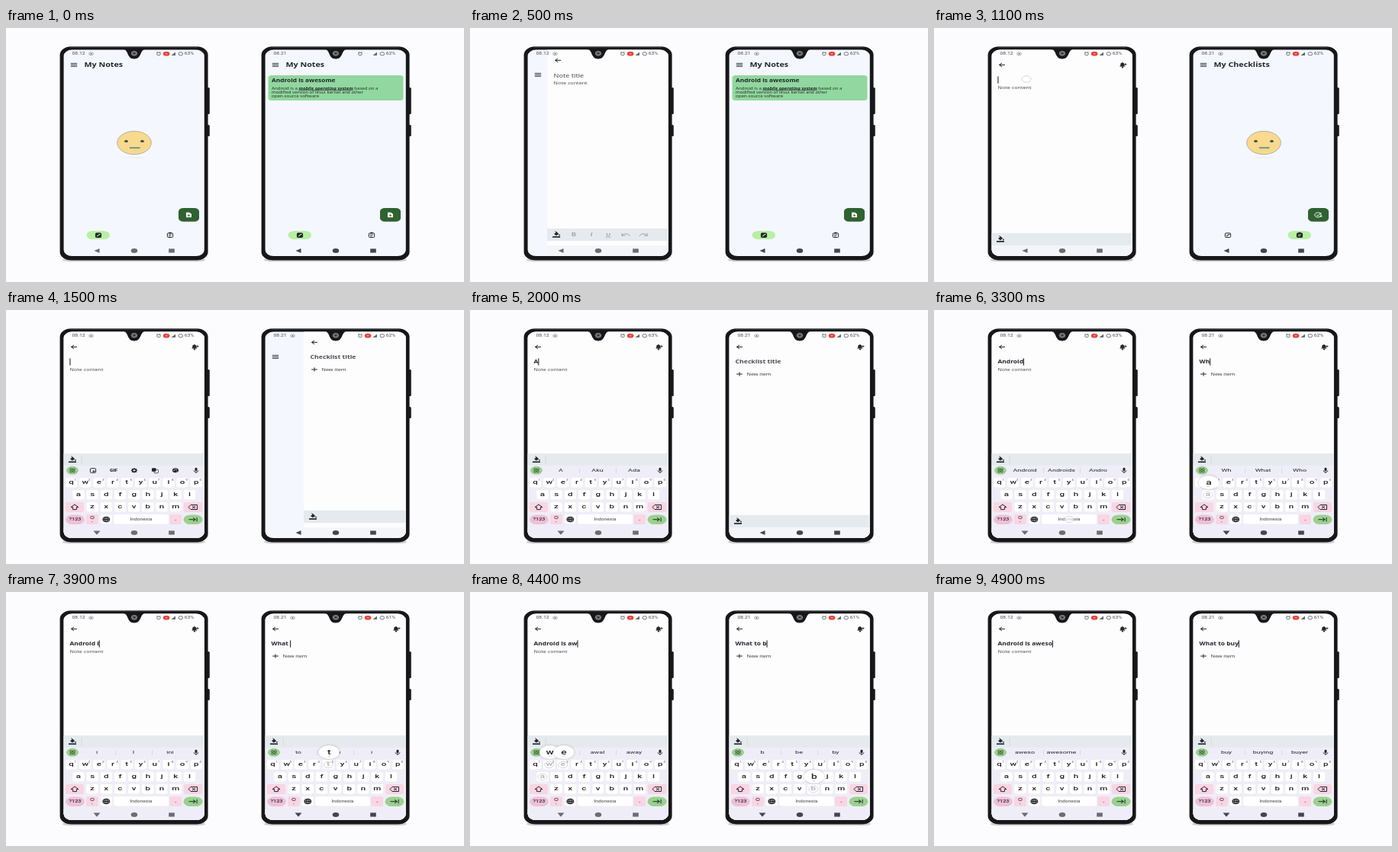
An HTML page with a canvas that plays this animation: 600 by 333 pixels, repeating every 5000 ms.

```html
<!DOCTYPE html>
<html lang="en">
<head>
<meta charset="utf-8">
<title>Notes app on two phones</title>
<style>
html, body { margin: 0; width: 100%; height: 100%; overflow: hidden; background: #fcfbfd; }
canvas { display: block; width: 600px; height: 333px; }
</style>
</head>
<body>
<canvas id="stage"></canvas>
<script>
const canvas = document.getElementById('stage');
const ctx = canvas.getContext('2d');
const dpr = window.devicePixelRatio || 1;
canvas.width = 600 * dpr;
canvas.height = 333 * dpr;

const LOOP = 5000, STEP = 100;
const UI = '"Noto Sans", "Open Sans", sans-serif';
const KEYS = 'Roboto, sans-serif';
const INK = '#24262b', GREEN = '#2f6231', PALE = '#b9efa5', PINK = '#fad5e3', LEAF = '#9bd08f';
const ROWS = ['qwertyuiop', 'asdfghjkl', 'zxcvbnm'];
const ROW_X = [85.5, 95, 113], PITCH = 18.2;

const phones = [
  {
    x: 0, clock: '08.12', battery: () => '63%', nav: '#6c6c70',
    tab: () => 0, card: false, hint: 'Note title', sub: 'Note content',
    open: 350, focus: 1000, rise: 1250,
    typed: 'Android is aweso',
    at: [1800, 2150, 2300, 2450, 2600, 2900, 3050, 3350, 3700, 4050, 4200, 4300, 4400, 4500, 4600, 4700],
    words: ['', 'A Aku Ada', 'An And Anda', 'And Anda Android', 'Andr Android Andri', 'Andro Android Andri',
      'Androi Android Andro', 'Android Androids Andro', 'dan yang di', 'i I ini', 'is isi ini', 'a the not',
      'a ada aku', 'aw awal away', 'awe awesome awet', 'awes awesome', 'aweso awesome'],
    taps: [[200, 239, 245], [1000, 121, 67]]
  },
  {
    x: 264, clock: '08.21', battery: t => t < 3800 ? '62%' : '61%', nav: '#45464b',
    tab: t => ease((t - 700) / 200), card: true, hint: 'Checklist title', sub: 'New item',
    open: 1400, focus: 2100, rise: 2150,
    typed: 'What to buy',
    at: [2950, 3150, 3350, 3500, 3650, 3950, 4100, 4250, 4400, 4550, 4700],
    words: ['', 'W Wa We', 'Wh What Who', 'Wha What Whats', 'What Whats Whatever', 'to you i', 't the to',
      'to too today', 'do be buy', 'b be by', 'bu but buy', 'buy buying buyer'],
    taps: [[600, 215, 271], [1300, 239, 245], [2100, 125, 67]]
  }
];

const clamp = v => Math.max(0, Math.min(1, v));
const ease = v => 1 - (1 - clamp(v)) ** 3;

function text(s, x, y, size, { w = 400, c = INK, a = 'left', f = UI, k = 1.28, i = '' } = {}) {
  ctx.save();
  ctx.translate(x, y + size * 0.36);
  ctx.scale(k, 1);
  ctx.font = `${i} ${w} ${size}px ${f}`;
  ctx.textAlign = a;
  ctx.fillStyle = c;
  ctx.fillText(s, 0, 0);
  const width = ctx.measureText(s).width * k;
  ctx.restore();
  return width;
}

function box(x, y, w, h, rx, ry, fill) {
  ctx.beginPath();
  ctx.roundRect(x, y, w, h, { x: rx, y: ry });
  if (fill) { ctx.fillStyle = fill; ctx.fill(); }
}

function rect(x, y, w, h, fill) {
  ctx.fillStyle = fill;
  ctx.fillRect(x, y, w, h);
}

function oval(x, y, rx, ry, fill, stroke, width = 0.8) {
  ctx.beginPath();
  ctx.ellipse(x, y, rx, ry, 0, 0, Math.PI * 2);
  if (fill) { ctx.fillStyle = fill; ctx.fill(); }
  if (stroke) { ctx.strokeStyle = stroke; ctx.lineWidth = width; ctx.stroke(); }
}

// Points are given flat: x, y, x, y...
function poly(pts, { fill, stroke, width = 1, close = false } = {}) {
  ctx.beginPath();
  for (let n = 0; n < pts.length; n += 2) ctx.lineTo(pts[n], pts[n + 1]);
  if (close) ctx.closePath();
  if (fill) { ctx.fillStyle = fill; ctx.fill(); }
  if (stroke) { ctx.strokeStyle = stroke; ctx.lineWidth = width; ctx.stroke(); }
}

function faded(alpha, draw) {
  if (alpha <= 0) return;
  ctx.save();
  ctx.globalAlpha *= alpha;
  draw();
  ctx.restore();
}

function shifted(dx, dy, draw) {
  ctx.save();
  ctx.translate(dx, dy);
  draw();
  ctx.restore();
}

function sheet(x, y, c, solid) {
  ctx.lineWidth = 1;
  ctx.strokeStyle = c;
  box(x - 3.6, y - 2.6, 7.2, 5.6, 1, 1, solid ? c : null);
  ctx.stroke();
}

function pencilIcon(x, y, solid) {
  sheet(x, y, INK, solid);
  poly([x - 2, y + 1.6, x + 2.4, y - 1.5], { stroke: solid ? PALE : INK, width: 1.1 });
}

function listIcon(x, y, solid) {
  sheet(x, y, INK, solid);
  rect(x - 1.6, y - 3.7, 3.2, 1.6, INK);
  for (const d of [-0.9, 0.9]) rect(x - 2, y + d, d < 0 ? 4 : 2.8, 0.8, solid ? PALE : INK);
}

function bucket(x, y) {
  poly([x - 3, y - 0.6, x + 0.4, y - 3.2, x + 3.2, y - 0.4, x - 0.2, y + 1.7], { fill: INK, close: true });
  poly([x - 1.6, y - 4, x + 0.4, y - 2.4], { stroke: INK });
  oval(x + 4, y + 1, 0.9, 0.9, INK);
  rect(x - 5, y + 2.6, 10, 1.7, INK);
}

function mic(x, y) {
  box(x - 1.5, y - 3.6, 3, 4.6, 1.5, 1.2, INK);
  ctx.beginPath();
  ctx.ellipse(x, y, 3, 2.2, 0, 0, Math.PI);
  ctx.strokeStyle = INK;
  ctx.lineWidth = 0.8;
  ctx.stroke();
  rect(x - 0.5, y + 2, 1, 1.6, INK);
}

function plus(x, y, rx, ry, c, w = 1) {
  poly([x - rx, y, x + rx, y], { stroke: c, width: w });
  poly([x, y - ry, x, y + ry], { stroke: c, width: w });
}

function face() {
  oval(168, 170, 14, 0.8, '#eceef4');
  oval(168, 150.5, 22.3, 15.2, '#f9d98d', '#a3aba4', 0.9);
  for (const x of [157.5, 178.5]) oval(x, 148.4, 2.4, 1.7, '#42524f');
  rect(162, 156.3, 13.5, 1.5, '#3f8d86');
}

function noteCard() {
  box(79.5, 62, 177, 33, 4.5, 3.2, '#91d79f');
  text('Android is awesome', 84, 68.7, 6.5, { w: 600 });
  const body = { c: '#26382b' }, size = 4.75;
  let x = 84;
  x += text('Android is a ', x, 78.8, size, body);
  const w = text('mobile operating system', x, 78.8, size, { w: 700, i: 'italic' });
  rect(x, 81.2, w, 0.6, INK);
  text(' based on a', x + w, 78.8, size, body);
  text('modified version of linux kernel and other', 84, 84, size, body);
  text('open-source software', 84, 89.2, size, body);
}

function home(p, t, headerY) {
  const tab = p.tab(t);
  rect(75, 28, 187, 272, '#f5f7fe');
  for (const d of [-2, 0, 2]) rect(84.8, headerY + d - 0.1, 8.4, 0.9, INK);
  if (headerY > 48) return;
  faded(1 - tab, () => {
    text('My Notes', 102.5, 48.2, 8.4, { w: 600 });
    p.card ? noteCard() : face();
  });
  faded(tab, () => {
    text('My Checklists', 102.5, 48.2, 8.4, { w: 600 });
    face();
  });
  box(226, 236.6, 27, 17.8, 6.5, 4.5, '#00000018');
  box(226, 236, 27, 17.8, 6.5, 4.5, GREEN);
  if (tab < 0.5) {
    poly([236, 241.7, 240, 241.7, 243, 243.7, 243, 248.3, 236, 248.3], { fill: '#fff', close: true });
    plus(239.5, 245.8, 1.9, 1.4, GREEN, 0.9);
  } else {
    oval(239, 245, 4.1, 3, null, '#fff', 0.9);
    poly([237, 244.8, 238.7, 246.3, 243.5, 242.2], { stroke: '#fff' });
    plus(243, 246.8, 1.6, 1.2, '#fff', 0.8);
  }
  box(tab < 0.5 ? 105.5 : 199.5, 266, 30.5, 11, 8, 5.5, PALE);
  pencilIcon(121, 271.5, tab < 0.5);
  listIcon(215, 271.5, tab >= 0.5);
}

function formatBar(t, p, lift) {
  const y = 277 - lift;
  rect(75, y - 8.2, 187, 16.4, '#e5eaef');
  bucket(87, y - 0.5);
  const fade = p.x ? 0 : 1 - clamp((t - 800) / 300);
  faded(fade * 0.6, () => {
    const grey = '#777b82', o = { w: 700, c: grey, a: 'center', f: KEYS, k: 1.45 };
    text('B', 110, y, 6.5, o);
    text('I', 133, y, 6.5, { ...o, i: 'italic' });
    text('U', 155, y - 0.6, 6, o);
    rect(151.5, y + 2.8, 7, 0.8, grey);
    for (const [x, s] of [[178, 1], [201, -1]]) {
      poly([x - 5 * s, y - 2, x - 5 * s, y + 1.2, x - s, y + 1.2], { stroke: grey });
      ctx.beginPath();
      ctx.ellipse(x, y + 2, 5, 3, 0, Math.PI, Math.PI * 2);
      ctx.stroke();
    }
  });
  if (lift > 40) rect(98.7, y - 5, 0.7, 10, '#cfd5da');
}

function editor(p, t, lift, typed) {
  rect(75, 28, 190, 272, '#fdfdfe');
  poly([93, 48.4, 85.6, 48.4], { stroke: INK });
  poly([89, 46, 85.4, 48.4, 89, 50.8], { stroke: INK });
  if (t >= p.open + 300) {
    poly([243, 50.6, 244.2, 49.3, 244.4, 46.5, 247, 45.1, 249, 46.6, 249.4, 49.3, 250.6, 50.6], { fill: INK, close: true });
    oval(247, 51.5, 1.3, 0.9, INK);
    plus(250.8, 47.7, 1.8, 1.5, INK, 0.9);
  }
  if (t < p.focus) {
    text(p.hint, 83.5, 68, p.x ? 6.8 : 7.1, { w: p.x ? 600 : 500, c: '#4b4d52' });
  } else {
    const w = text(typed, 83.5, 67.9, 6.6, { w: 600 });
    rect(83.4 + w, 63.4, 1.1, 9.2, INK);
  }
  if (p.x) {
    plus(89, 84, 3.8, 2.7, INK);
    text(p.sub, 98.5, 83.8, 5.6, { w: 500, c: '#3c3e43' });
  } else {
    text(p.sub, 83.5, 78.3, 5.6, { w: 500, c: '#4b4d52' });
  }
  formatBar(t, p, lift);
}

function toolStrip(y) {
  sheet(114, y, INK);
  oval(115, y + 1.2, 1.6, 1, INK);
  text('GIF', 141, y, 5, { w: 900, a: 'center', f: KEYS });
  oval(168, y, 2.5, 1.8, null, INK, 1.7);
  for (let n = 0; n < 8; n++) {
    const a = n * Math.PI / 4;
    oval(168 + 3.6 * Math.cos(a), y + 2.6 * Math.sin(a), 0.7, 0.6, INK);
  }
  box(191, y - 3, 5.5, 4.4, 0.8, 0.8, INK);
  ctx.lineWidth = 0.7;
  ctx.strokeStyle = INK;
  box(194, y - 1, 5.5, 4.4, 0.8, 0.8);
  ctx.stroke();
  oval(222, y, 4, 3, INK);
  for (const [dx, dy] of [[-2, 0], [-0.6, -1.5], [1.4, -1.2], [2, 1.8]]) oval(222 + dx, y + dy, 0.7, 0.6, '#fff');
}

function keyPos(ch) {
  for (let r = 0; r < 3; r++) {
    const n = ROWS[r].indexOf(ch.toLowerCase());
    if (n >= 0) return [ROW_X[r] + n * PITCH, 226.5 + r * 16];
  }
  return [177, 274.5];
}

function key(x, y, w, fill = '#fff') {
  box(x - w / 2, y - 6.1, w, 12.6, 3, 2.2, '#e0dde8');
  box(x - w / 2, y - 6.4, w, 12.6, 3, 2.2, fill);
}

function keyboard(words) {
  rect(75, 203.8, 187, 97, '#efedf7');
  oval(87, 210.3, 8, 5.5, LEAF);
  ctx.strokeStyle = '#2b4a2e';
  ctx.lineWidth = 0.8;
  for (const dx of [-3.2, 0.5]) for (const dy of [-2.5, 0.4]) {
    box(87 + dx, 210.3 + dy, 2.7, 2.1, 0.6, 0.6);
    ctx.stroke();
  }
  mic(249, 210.3);
  const label = { a: 'center', f: KEYS, k: 1.45 };
  if (words) {
    words.split(' ').forEach((s, n) => text(s, 119 + 48 * n, 210.1, 6.2, label));
    for (const x of [143, 191]) rect(x, 207, 0.6, 7, '#cfccd8');
  } else {
    toolStrip(210.3);
  }

  ROWS.forEach((row, r) => [...row].forEach((ch, n) => {
    const x = ROW_X[r] + n * PITCH, y = 226.5 + r * 16;
    key(x, y, 15.6);
    text(ch, x, y - 1, 8, { ...label, w: 500 });
    if (!r) text((n + 1) % 10, x + 5.4, y - 4, 3.2, { ...label, c: '#55575c' });
  }));

  key(90, 258.5, 24, PINK);
  poly([90, 255, 95, 258.7, 92.4, 258.7, 92.4, 261.6, 87.6, 261.6, 87.6, 258.7, 85, 258.7], { stroke: INK, close: true });
  key(245, 258.5, 24, PINK);
  poly([239, 258.5, 242, 255.5, 250.5, 255.5, 250.5, 261.5, 242, 261.5], { stroke: INK, close: true });
  poly([244, 257, 248, 260], { stroke: INK });
  poly([248, 257, 244, 260], { stroke: INK });

  box(78, 268.4, 25, 12.6, 9, 6.3, '#f0bfd8');
  text('?123', 90.5, 274.6, 5, { ...label, w: 500 });
  key(113, 274.5, 15.6, PINK);
  oval(113, 272, 2.4, 1.7, null, INK, 0.7);
  text(',', 113, 276, 5, label);
  key(131.3, 274.5, 15.6);
  oval(131.3, 274.5, 4.4, 3.2, '#85878c', INK, 1.1);
  oval(131.3, 274.5, 1.9, 3.2, null, INK, 0.8);
  rect(127, 274.1, 8.6, 0.9, INK);
  key(177, 274.5, 72);
  text('Indonesia', 177, 274.5, 4.6, { ...label, c: '#404247' });
  key(222.2, 274.5, 15.6, PINK);
  text('.', 222.2, 273.5, 8, label);
  box(232.5, 268.4, 25, 12.6, 9, 6.3, LEAF);
  poly([239.5, 274.7, 248, 274.7], { stroke: INK });
  poly([245, 272.4, 248.3, 274.7, 245, 277], { stroke: INK });
  rect(249.6, 272, 1, 5.4, INK);
}

function ring(x, y) {
  oval(x, y, 6, 4.2, '#ffffffa0', '#d6d6dc', 1);
}

function popup(ch, x, y) {
  ctx.save();
  ctx.shadowColor = '#00000040';
  ctx.shadowBlur = 3;
  oval(x + 1, y - 16.5, 13.5, 9, '#fff');
  ctx.restore();
  text(ch, x + 1, y - 17, 9.5, { a: 'center', f: KEYS, k: 1.45, w: 500 });
  text('…', x + 1, y - 11.5, 4, { a: 'center', f: KEYS });
}

function statusBar(p, t) {
  const o = { f: KEYS, k: 1.45, c: '#4a4c52' };
  text(p.clock, 86.5, 33.8, 4.7, o);
  if (!p.x || t >= 300) {
    oval(111.5, 33.8, 3, 1.9, null, '#85888e', 0.7);
    oval(111.5, 33.8, 1, 0.9, '#55575c');
    box(205.8, 31, 8.6, 5.6, 3.4, 2.8, '#e8413a');
    rect(208.8, 33.3, 2.6, 0.9, '#ffffffc0');
  }
  oval(200, 34, 2.4, 1.8, null, '#55575c', 0.8);
  poly([197.4, 32, 198.8, 31.2], { stroke: '#55575c', width: 0.8 });
  poly([201.2, 31.2, 202.6, 32], { stroke: '#55575c', width: 0.8 });
  poly([216.5, 36, 222, 36, 222, 31.4], { fill: '#65676c', close: true });
  oval(228.8, 33.8, 2.9, 2.1, null, '#65676c', 0.9);
  text(p.battery(t), 233.7, 33.8, 4.7, o);
}

function navBar(color, down) {
  poly(down ? [114.5, 289.4, 123.5, 289.4, 119, 294.8] : [115.5, 292, 122.5, 289, 122.5, 295],
    { fill: color, close: true });
  oval(168, 292, 4.3, 3, color);
  rect(213.2, 289.4, 7.6, 5.2, color);
}

function shell() {
  box(261, 78, 5.8, 35, 1.5, 1.5, '#1c1c1f');
  box(261, 127, 5.8, 15, 1.5, 1.5, '#1c1c1f');
  box(74, 302, 187, 4.2, 9, 2, '#00000030');
  box(70.6, 24.2, 194, 280.2, 15, 11, '#17171a');
  poly([84, 24.8, 251, 24.8], { stroke: '#77797d', width: 0.9 });
}

function notch() {
  ctx.beginPath();
  ctx.moveTo(154, 28);
  ctx.bezierCurveTo(161, 29, 158, 40.5, 168, 40.5);
  ctx.bezierCurveTo(178, 40.5, 175, 29, 182, 28);
  ctx.fillStyle = '#17171a';
  ctx.fill();
  oval(168, 33.3, 3.8, 2.9, '#6a6c72', '#8d8f94', 0.8);
  oval(168, 33.3, 1.5, 1.1, '#2c2d32');
}

function phone(p, t) {
  const count = p.at.filter(c => c <= t).length;
  const up = ease((t - p.rise) / 250);
  const lift = up * 80.7;
  const slide = (1 - clamp((t - p.open) / 350)) ** 3;
  const opened = t > p.open;

  shell();
  ctx.save();
  box(75.6, 28.6, 184.2, 270.4, 11, 8);
  ctx.clip();
  home(p, t, opened ? 61 : 48);
  if (opened) {
    const dx = 140 * slide;
    shifted(dx, -6 * clamp(dx / 24), () => editor(p, t, lift, p.typed.slice(0, count)));
    rect(75 + dx, 285.2, 187, 15, '#f4f5f9');
  }
  if (up > 0) shifted(0, 95 * (1 - up), () => keyboard(p.words[count]));
  statusBar(p, t);
  navBar(p.nav, up > 0.5);

  for (const [start, x, y] of p.taps) if (t >= start && t < start + 200) ring(x, y);
  p.at.forEach((c, n) => {
    if (t < c - 100 || t >= c + 150) return;
    const ch = p.typed[n], [x, y] = keyPos(ch);
    ring(x, y);
    if (t < c + 20 && ch !== ' ') popup(ch, x, y);
  });
  ctx.restore();
  notch();
}

function frame(now) {
  const t = Math.floor((now % LOOP) / STEP) * STEP;
  ctx.setTransform(dpr, 0, 0, dpr, 0, 0);
  rect(0, 0, 600, 333, '#fcfbfd');
  for (const p of phones) shifted(p.x, 0, () => phone(p, t));
  requestAnimationFrame(frame);
}

requestAnimationFrame(frame);
</script>
</body>
</html>
```
